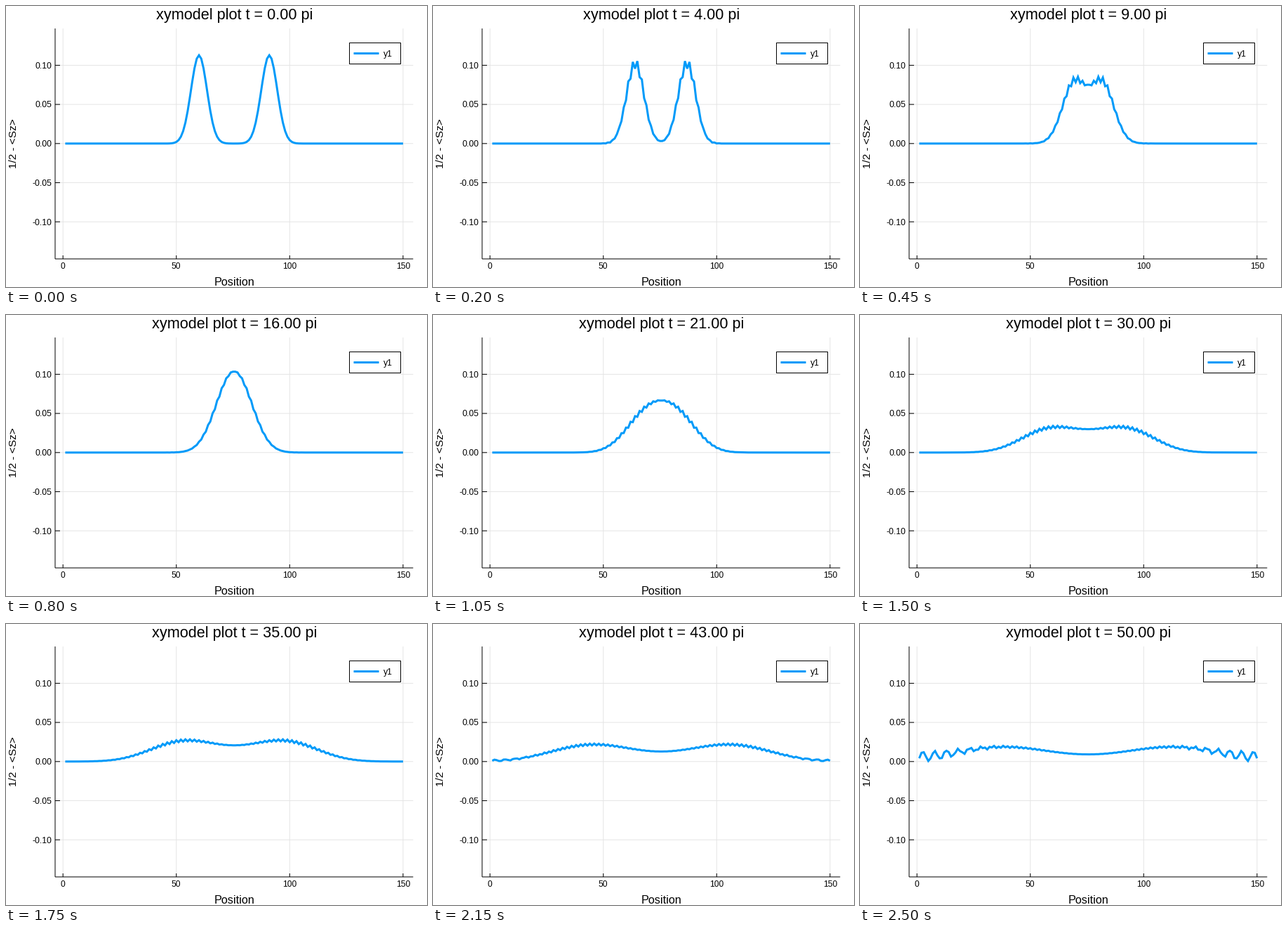
Recreate the animation shown at these times as a matplotlib script. Size 600 by 400 pixels, loop 2550 ms.

```python
import numpy as np
import matplotlib.pyplot as plt
from matplotlib.animation import FuncAnimation
from matplotlib.patches import Rectangle

W, H, DPI = 600, 400, 100
FRAMES, INTERVAL = 51, 50
BLUE = "#009AF9"
FONT = "Liberation Sans"

# Plot area in pixels
LEFT, RIGHT, TOP, BOTTOM = 70, 580.3, 32, 360
X0, X_SCALE = 81.2, 3.231
Y0, Y_SCALE = 195.8, 1114

# Spin chain: two wave packets that run towards each other
SITES = 150
START, WIDTH, MOMENTUM = 60, 5, 1 / 3
STEP = 0.1 * np.pi
STEPS_PER_FRAME = 10


def px(x):
    return X0 + X_SCALE * x


def py(y):
    return Y0 - Y_SCALE * y


def bond_gates(first):
    """Hopping over every second bond for one time step."""
    gate = np.eye(SITES, dtype=complex)
    c, s = np.cos(STEP / 2), 1j * np.sin(STEP / 2)
    for j in range(first, SITES - 1, 2):
        gate[j:j + 2, j:j + 2] = [[c, s], [s, c]]
    return gate


def densities():
    site = np.arange(1, SITES + 1)
    psi = np.exp(-((site - START) / WIDTH) ** 2 / 2 + 1j * MOMENTUM * site)
    psi /= np.linalg.norm(psi)
    advance = np.linalg.matrix_power(bond_gates(1) @ bond_gates(0),
                                     STEPS_PER_FRAME)
    rows = []
    for _ in range(FRAMES):
        p = np.abs(psi) ** 2
        rows.append(p + p[::-1])  # the second packet is the mirror image
        psi = advance @ psi
    return site, rows


fig = plt.figure(figsize=(W / DPI, H / DPI), dpi=DPI, facecolor="white")
ax = fig.add_axes([0, 0, 1, 1])
ax.set_xlim(0, W)
ax.set_ylim(H, 0)
ax.axis("off")


def stroke(xs, ys, color="black", width=1.0, **kw):
    return ax.plot(xs, ys, color=color, lw=width * 72 / DPI, snap=False,
                   solid_capstyle="butt", **kw)[0]


def label(x, y, text, size, ha="center", **kw):
    return ax.text(x, y, text, fontsize=size * 72 / DPI, family=FONT,
                   ha=ha, va="baseline", color="black", **kw)


for v in (0, 50, 100, 150):
    stroke([px(v)] * 2, [TOP, BOTTOM], "#e5e5e5", zorder=1)
    stroke([px(v)] * 2, [BOTTOM - 5, BOTTOM], zorder=2)
    label(px(v), 374.5, str(v), 12)
for v in (-0.10, -0.05, 0.00, 0.05, 0.10):
    stroke([LEFT, RIGHT], [py(v)] * 2, "#e5e5e5", zorder=1)
    stroke([LEFT, LEFT + 7], [py(v)] * 2, zorder=2)
    label(65.2, py(v) + 4.3, f"{v:.2f}", 12.1, ha="right")
stroke([LEFT, LEFT], [TOP, BOTTOM], zorder=2)
stroke([LEFT, RIGHT], [BOTTOM, BOTTOM], zorder=2)

label(325.7, 398, "Position", 16.3)
label(15, 195.6, "1/2 - <Sz>", 15.4, rotation=90, rotation_mode="anchor")
title = label(326, 18.6, "", 21.6)

site, profiles = densities()
curve = stroke(px(site), py(profiles[0]), BLUE, 3, zorder=3,
               solid_joinstyle="miter")

ax.add_patch(Rectangle((489.5, 52.5), 73, 30, fc="white", ec="black",
                       lw=72 / DPI, snap=False, zorder=4))
stroke([495.5, 531.5], [67.5, 67.5], BLUE, 3, zorder=5)
label(538, 72, "y1", 12.2, ha="left", zorder=5)


def draw(i):
    curve.set_ydata(py(profiles[i]))
    title.set_text(f"xymodel plot t = {i:.2f} pi")
    return curve, title


anim = FuncAnimation(fig, draw, frames=FRAMES, interval=INTERVAL,
                     repeat=True, repeat_delay=0, blit=False)
plt.show()
```
